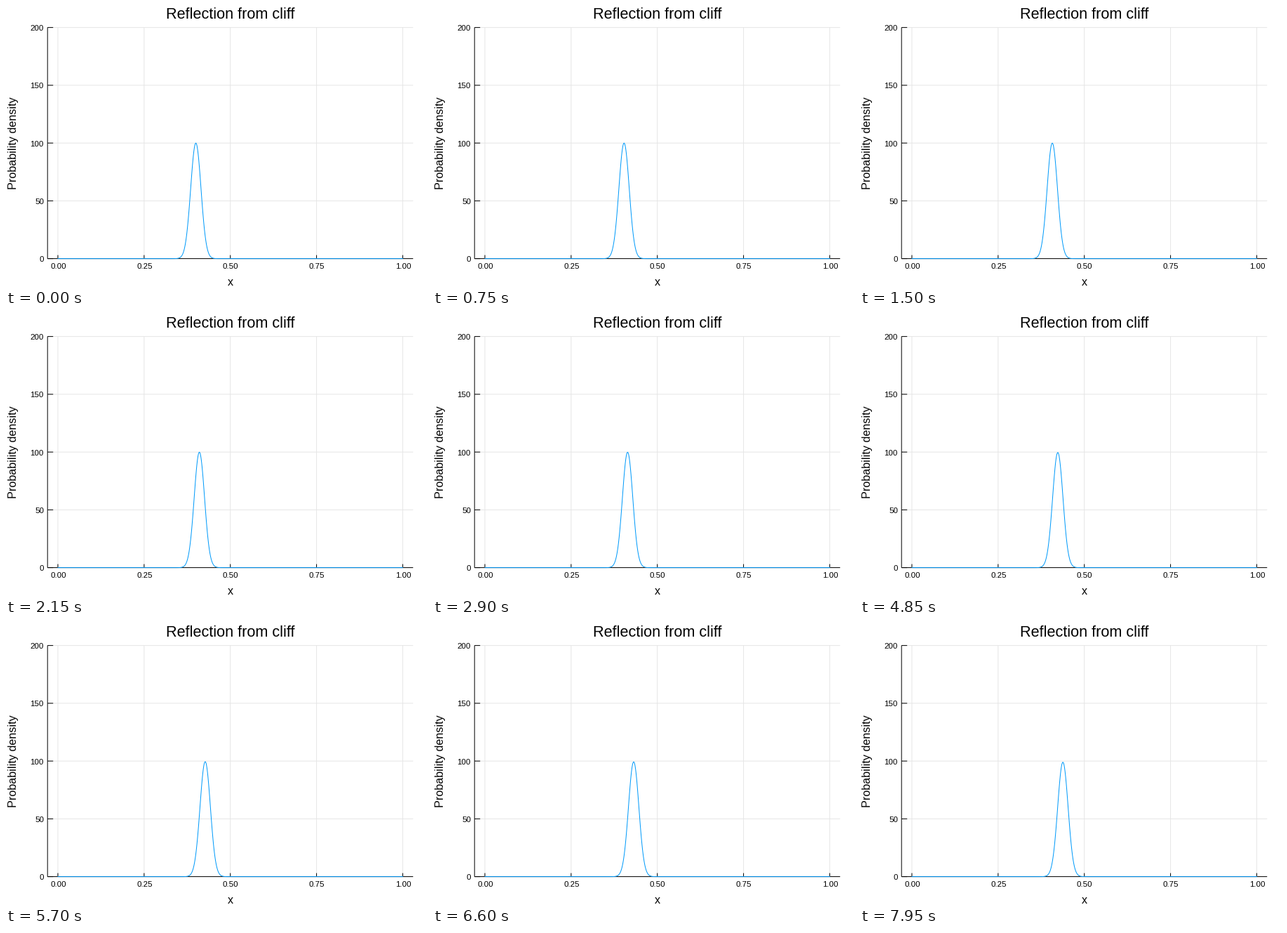
These frames come from a looping animation (600 by 400 pixels, 8000 ms). A matplotlib script:

```python
import numpy as np
import matplotlib.pyplot as plt
from matplotlib.animation import FuncAnimation

W, H, DPI = 600, 400, 100
FRAMES, INTERVAL = 160, 50
LEFT, RIGHT, TOP, BASE = 59.2, 580.2, 30.6, 359.6
BLUE, GRID = "#009afa", "#e6e6e6"

plt.rcParams["font.family"] = "Liberation Sans"
plt.rcParams["path.simplify"] = False

fig = plt.figure(figsize=(W / DPI, H / DPI), dpi=DPI, facecolor="white")
ax = fig.add_axes([0, 0, 1, 1])
ax.set_xlim(0, W)
ax.set_ylim(H, 0)
ax.axis("off")


def px(n):
    return n * 72 / DPI


def to_x(v):
    return LEFT + (v + 0.03) * (RIGHT - LEFT) / 1.06


def to_y(v):
    return BASE - v * (BASE - TOP) / 200


def rule(xs, ys, color="black", z=2):
    ax.plot(xs, ys, color=color, lw=px(1), zorder=z,
            solid_capstyle="butt", snap=False)


def label(x, y, s, size, **kw):
    kw = {"ha": "center", "va": "baseline", **kw}
    ax.text(x, y, s, fontsize=px(size), color="black", **kw)


for v in (0, 0.25, 0.5, 0.75, 1):
    x = to_x(v)
    rule([x, x], [TOP, BASE], GRID, 1)
    rule([x, x], [BASE, BASE - 5])
    label(x + 0.5, 374, f"{v:.2f}", 11.5)

for v in (0, 50, 100, 150, 200):
    y = to_y(v)
    rule([LEFT, RIGHT], [y, y], GRID, 1)
    rule([LEFT, LEFT + 8], [y, y])
    label(54, y + 4.6, str(v), 11.5, ha="right")

rule([LEFT, LEFT], [TOP, BASE])
rule([LEFT, RIGHT], [BASE, BASE])

label(319.3, 18, "Reflection from cliff", 21.6)
label(319.7, 398, "x", 16)
label(18.3, 195.5, "Probability density", 16.1, rotation=90,
      ha="right", va="center")

grid = np.linspace(0, 1, 1001)
curve, = ax.plot([], [], color=BLUE, lw=px(1), zorder=3, snap=False)


def density(k):
    """Drifting, slowly spreading Gaussian packet."""
    spread = 1 + 0.01 * (k / (FRAMES - 1)) ** 2
    centre = 0.4 + 0.000238 * k
    sigma = 0.015 * spread
    return 100 / spread * np.exp(-0.5 * ((grid - centre) / sigma) ** 2)


def draw(k):
    curve.set_data(to_x(grid), to_y(density(k)))
    return curve,


anim = FuncAnimation(fig, draw, frames=FRAMES, interval=INTERVAL,
                     repeat=True, repeat_delay=0, blit=False)
plt.show()
```
